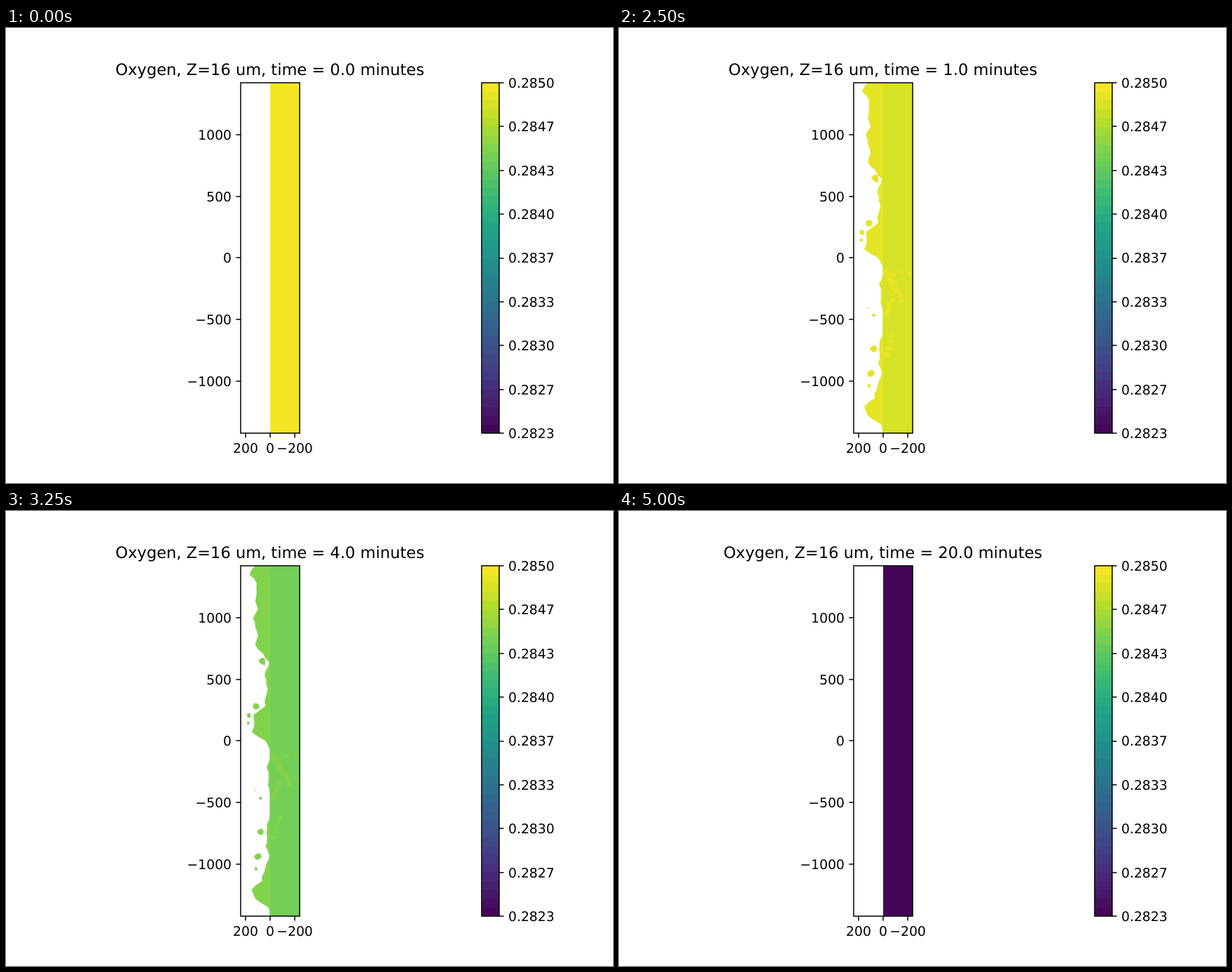
Animation of 864x648 px, one loop 5250 ms. Source, as an HTML page:

```html
<!DOCTYPE html>
<html lang="en">
<head>
<meta charset="utf-8">
<style>
  html, body { margin: 0; width: 100%; height: 100%; overflow: hidden; background: #fff; }
  svg { display: block; }
  text { font: 18.75px "DejaVu Sans", sans-serif; text-rendering: geometricPrecision; }
  #title { font-size: 22.5px; }
  .line { fill: none; stroke: #000; stroke-width: 1.5; }
</style>
</head>
<body>
<svg id="stage" width="864" height="648" viewBox="0 0 864 648"></svg>
<script>
const TOP = 78, BOTTOM = 577, HEIGHT = BOTTOM - TOP, MID = 327.3;
const LEFT = 334, WALL = 376, RIGHT = 418, BANDS = 40;
const UNIT = 0.1753; // pixels per micrometre

const viridis = ['440154', '482475', '414487', '355f8d', '2a788e', '21918c',
  '22a884', '44bf70', '7ad151', 'bddf26', 'fde725']
  .map(h => [0, 2, 4].map(i => parseInt(h.slice(i, i + 2), 16)));

function color(band) {
  const p = (band + 0.5) / BANDS * 10, i = Math.floor(p);
  return `rgb(${viridis[i].map((c, k) => Math.round(c + (viridis[i + 1][k] - c) * (p - i)))})`;
}

// Reach of the ragged edge left of the wall, evenly spaced from top to bottom
const reach = [22, 30, 20, 20, 22, 18, 25, 22, 18, 22, 11, 2, 7, 6, 4, 7, 7, 24, 23, 27, 7,
  0, 0, 6, 3, 4, 0, 0, 0, 2, 5, 5, 7, 2, 6, 9, 12, 27, 22, 3, 0];

// Loose islands: x, y, size
const islands = [[365, 214, 12], [356, 279, 10], [346, 291, 7], [345, 302, 5], [354, 398, 3],
  [362, 409, 5], [362, 457, 9], [359, 492, 11], [356, 510, 6]];

const noise = i => { const s = Math.sin(i * 12.9898) * 43758.5453; return s - Math.floor(s) - 0.5; };
const poly = points => `<polygon points="${points}"/>`;
const rect = (x, y, w, h, attrs) => `<rect x="${x}" y="${y}" width="${w}" height="${h}" ${attrs}/>`;
const label = (x, y, anchor, s) =>
  `<text x="${x}" y="${Math.round(y)}" text-anchor="${anchor}">${String(s).replace('-', '\u2212')}</text>`;
const line = d => `<path class="line" d="${d}"/>`;

function blob(x, y, size, seed) {
  const points = [];
  for (let k = 0; k < 6; k++) {
    const a = k * Math.PI / 3, r = size * (0.5 + 0.3 * noise(seed * 6 + k));
    points.push([x + r * Math.cos(a), y + r * Math.sin(a)]);
  }
  return poly(points.join(' '));
}

// The patches shrink slowly as the minutes pass
function patches(min) {
  const loss = 0.04 * min * min, edge = [[WALL, TOP]];
  reach.forEach((r, i) => {
    const next = reach[i + 1] ?? 0, mid = (r + next) / 2;
    const jag = mid > 3 ? 4 * noise(i + 1) : 0;
    [r, mid + jag].forEach((d, half) => {
      const y = TOP + (i + half / 2) * HEIGHT / (reach.length - 1);
      edge.push([WALL - Math.max(d - loss, y > MID ? 0.7 : 0), Math.min(y, BOTTOM)]);
    });
  });
  edge.push([WALL, BOTTOM]);
  return poly(edge.join(' ')) + islands.map(([x, y, size], i) =>
    size > loss ? blob(x, y, size - loss, i) : '').join('');
}

let spots = '';
for (let i = 0; i < 8; i++) spots += blob(380 + 3.2 * i, 346 + 6 * i, 10, 20 + i);
for (let i = 0; i < 4; i++) {
  spots += blob(380 + 11 * i, 350 + 3 * noise(i), 7, 30 + i) +
    blob(380 + 3 * i, 407 - 6 * i, 9, 40 + i) +
    blob(389 - 2.5 * i, 438 + 9 * i, 9, 50 + i);
}

let art = rect(WALL, TOP, RIGHT - WALL, HEIGHT, 'id="field"') +
  `<g id="contour">${spots}<g id="patches"></g></g>`;

for (let b = 0; b < BANDS; b++) {
  const y = BOTTOM - (b + 1) * HEIGHT / BANDS;
  art += rect(677, y, 25, HEIGHT / BANDS + 0.3, `fill="${color(b)}" shape-rendering="crispEdges"`);
}
for (const [x, w] of [[LEFT, RIGHT - LEFT], [677, 25]]) art += rect(x, TOP, w, HEIGHT, 'class="line"');

for (let v = -1000; v <= 1000; v += 500) {
  const y = MID - v * UNIT;
  art += line(`M${LEFT} ${Math.round(y)}h-6.6`) + label(321, y + 6.9, 'end', v);
}
for (const v of [200, 0, -200]) {
  const x = Math.round(WALL - v * UNIT);
  art += line(`M${x} ${BOTTOM}v6.6`) + label(x, 605, 'middle', v);
}
for (let i = 0; i < 9; i++) {
  const y = TOP + i * HEIGHT / 8;
  art += line(`M702 ${Math.round(y)}h6.6`) + label(715, y + 6.9, 'start', (0.285 - i / 3000).toFixed(4));
}
art += '<text id="title" x="375.6" y="67" text-anchor="middle"></text>';

const byId = id => document.getElementById(id);
byId('stage').innerHTML = art;

function show(step) {
  const min = step <= 10 ? step / 10 : step < 20 ? step - 9 : 20;
  const level = BANDS - 2 * min;
  // The contour appears only when the field sits exactly on a band edge
  const onEdge = Number.isInteger(level) && level > 0 && level < BANDS;
  const band = onEdge ? level - 1 : Math.min(BANDS - 1, Math.floor(level));

  byId('title').textContent = `Oxygen, Z=16 um, time = ${min.toFixed(1)} minutes`;
  byId('field').setAttribute('fill', color(band));
  byId('contour').style.display = onEdge ? '' : 'none';
  if (!onEdge) return;
  byId('contour').setAttribute('fill', color(level));
  byId('patches').innerHTML = patches(min);
}

let last = -1;
const start = performance.now();
function tick() {
  const step = Math.floor((performance.now() - start) % 5250 / 250);
  if (step !== last) show(last = step);
  requestAnimationFrame(tick);
}
tick();
</script>
</body>
</html>
```
